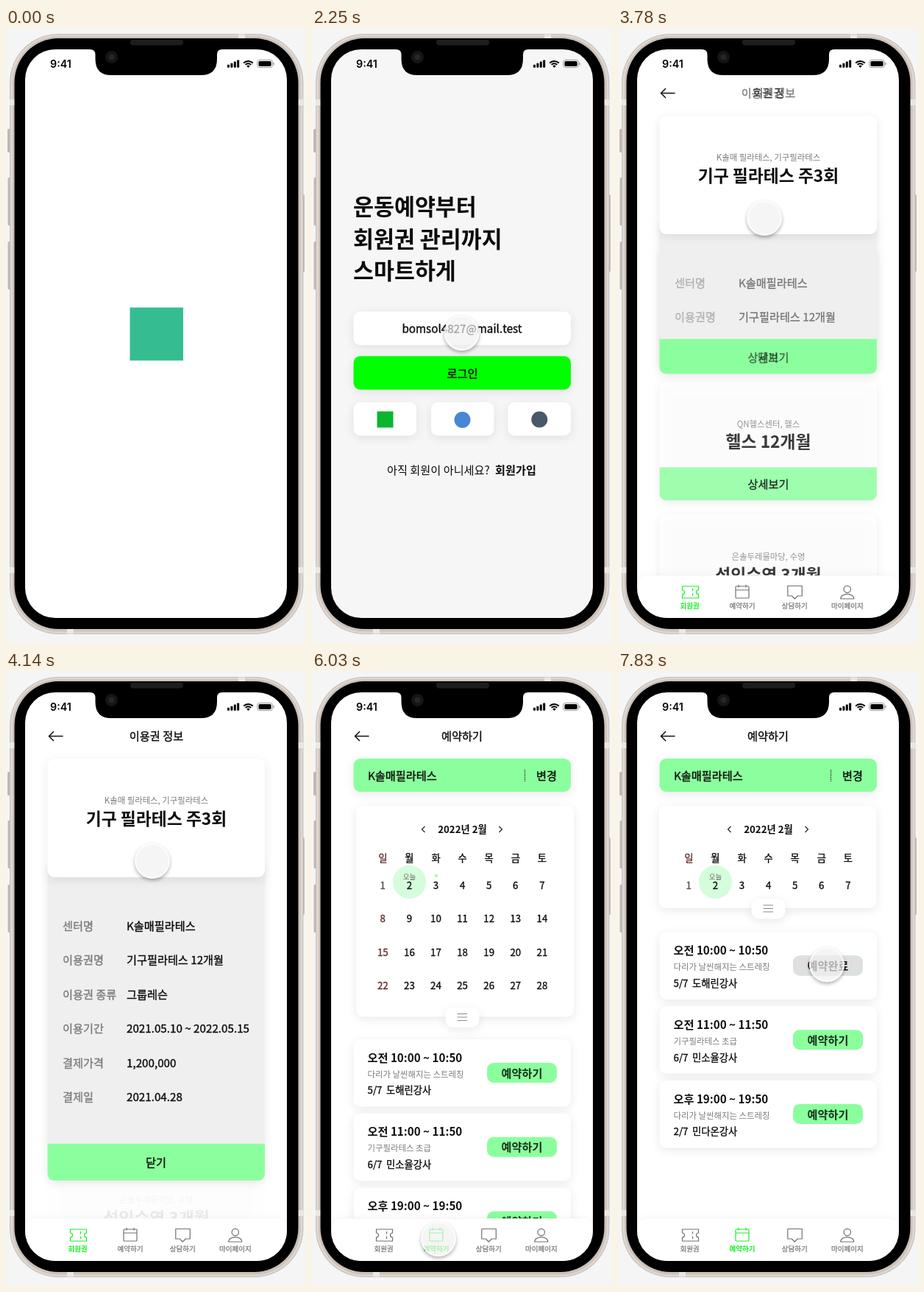
Animation of 408 by 835 pixels, one loop 8000 ms. Source, as an HTML page with a canvas:

```html
<!DOCTYPE html>
<html lang="ko">
<head>
<meta charset="utf-8">
<title>운동 예약 앱</title>
<style>
  html, body { margin: 0; width: 100%; height: 100%; overflow: hidden; background: #f5f5f5; }
  canvas { display: block; width: 408px; height: 835px; }
</style>
</head>
<body>
<canvas id="stage"></canvas>
<script>
const LOOP = 8000;
const FONT = '"Noto Sans CJK KR", "Noto Sans KR", "Noto Sans CJK", sans-serif';
const GREEN = '#8bff9d';
const INK = '#0c0c0c';
const GRAY = '#7c7c7c';
const TABS_TOP = 743.5;

const canvas = document.getElementById('stage');
const c = canvas.getContext('2d');
const dpr = window.devicePixelRatio || 1;
canvas.width = 408 * dpr;
canvas.height = 835 * dpr;

// timing helpers
const clamp = v => Math.max(0, Math.min(1, v));
const span = (t, a, b) => clamp((t - a) / (b - a));
const smooth = u => u * u * (3 - 2 * u);
const easeOut = u => 1 - (1 - u) ** 3;
const mix = (a, b, u) => a + (b - a) * u;
const leaving = p => 1 - p ** 2.5;

// drawing helpers
function fade(alpha, draw) {
  if (alpha <= 0) return;
  c.save();
  c.globalAlpha *= alpha;
  draw();
  c.restore();
}

function clipped(x, y, w, h, draw) {
  c.save();
  c.beginPath();
  c.rect(x, y, w, h);
  c.clip();
  draw();
  c.restore();
}

function box(x, y, w, h, r, color) {
  c.fillStyle = color;
  c.beginPath();
  c.roundRect(x, y, w, h, r);
  c.fill();
}

function card(x, y, w, h, r = 9, color = '#fff') {
  c.save();
  c.shadowColor = 'rgba(0,0,0,.09)';
  c.shadowBlur = 14 * dpr;
  c.shadowOffsetY = 3 * dpr;
  box(x, y, w, h, r, color);
  c.restore();
}

// Medium weight is the regular cut thickened by a hairline.
function text(s, x, y, size, color = INK, weight = 500, align = 'center', font = FONT) {
  c.font = `${weight} ${size}px ${font}`;
  c.fillStyle = color;
  c.textAlign = align;
  c.fillText(s, x, y + size * 0.37);
  if (weight === 500) {
    c.strokeStyle = color;
    c.lineWidth = size * 0.024;
    c.lineJoin = 'round';
    c.strokeText(s, x, y + size * 0.37);
  }
}

function disc(x, y, r, color) {
  c.fillStyle = color;
  c.beginPath();
  c.arc(x, y, r, 0, 7);
  c.fill();
}

function line(color, width, ...pts) {
  c.strokeStyle = color;
  c.lineWidth = width;
  c.lineJoin = 'miter';
  c.beginPath();
  for (let i = 0; i < pts.length; i += 2) c.lineTo(pts[i], pts[i + 1]);
  c.stroke();
}

// phone
function drawPhone() {
  for (const [x, y, h] of [[2, 137, 32], [2.5, 203, 65], [2.5, 290, 65], [402, 226, 105]])
    box(x, y, 4, h, 1.5, '#bdb7b2');
  box(5, 8, 399.5, 815, 66, '#c6beb8');
  box(6, 9, 397.5, 813, 65, '#ded7d0');
  box(9, 11.5, 391.5, 808, 62, '#cbc2bb');
  for (const y of [97, 732]) {
    box(5, y, 7, 8, 0, '#ebe7e3');
    box(397.5, y, 7, 8, 0, '#ebe7e3');
  }
  box(316, 8.5, 9, 6, 0, '#ebe7e3');
  box(83, 816, 9, 6.5, 0, '#ebe7e3');
  box(11.5, 14, 386, 802, 60, '#000');
}

function drawNotch() {
  c.fillStyle = '#000';
  c.beginPath();
  c.moveTo(114, 28);
  c.lineTo(294, 28);
  c.lineTo(294, 29);
  c.quadraticCurveTo(287, 29, 287, 36);
  c.lineTo(287, 42);
  c.quadraticCurveTo(287, 64, 265, 64);
  c.lineTo(143, 64);
  c.quadraticCurveTo(121.5, 64, 121.5, 42);
  c.lineTo(121.5, 36);
  c.quadraticCurveTo(121.5, 29, 114, 29);
  c.fill();
  box(169, 15.5, 72, 8, 4, '#1d1d1d');
  disc(143.5, 39.5, 8.5, '#151515');
  disc(143.5, 39.5, 4, '#262626');
}

function drawStatus() {
  text('9:41', 74.5, 48.5, 14.3, '#000', 600, 'center', 'Inter, sans-serif');
  for (let i = 0; i < 4; i++) {
    const h = 4 + 2.1 * i;
    box(301 + 4.4 * i, 53.8 - h, 3, h, 0.8, '#000');
  }
  c.strokeStyle = '#000';
  c.lineWidth = 2;
  for (const r of [8.6, 5.2]) {
    c.beginPath();
    c.arc(329.5, 53.5, r, -Math.PI * 0.76, -Math.PI * 0.24);
    c.stroke();
  }
  c.fillStyle = '#000';
  c.beginPath();
  c.moveTo(329.5, 54);
  c.arc(329.5, 53.5, 2.8, -Math.PI * 0.78, -Math.PI * 0.22);
  c.fill();
  c.strokeStyle = '#999';
  c.lineWidth = 1;
  c.beginPath();
  c.roundRect(341.8, 43.4, 20.6, 10.2, 3);
  c.stroke();
  box(343.5, 45, 17.2, 7, 1.7, '#000');
  box(363.4, 46.8, 1.3, 3.6, 0.6, '#999');
}

// shared parts
function backArrow() {
  line('#111', 1.5, 77.5, 88.5, 58.5, 88.5);
  line('#111', 1.5, 65, 82, 58.5, 88.5, 65, 95);
}

const tabIcons = [
  x => {
    c.beginPath();
    c.moveTo(x - 11, 758);
    c.lineTo(x + 11, 758);
    c.lineTo(x + 11, 763);
    c.arc(x + 11, 766, 3, -Math.PI / 2, Math.PI / 2, true);
    c.lineTo(x + 11, 774);
    c.lineTo(x - 11, 774);
    c.lineTo(x - 11, 769);
    c.arc(x - 11, 766, 3, Math.PI / 2, -Math.PI / 2, true);
    c.closePath();
    c.moveTo(x + 3, 761); c.lineTo(x + 3, 764.5);
    c.moveTo(x + 3, 767.5); c.lineTo(x + 3, 771);
    c.stroke();
  },
  x => {
    c.beginPath();
    c.roundRect(x - 9, 758, 18, 16, 1);
    c.moveTo(x - 9, 763); c.lineTo(x + 9, 763);
    c.moveTo(x - 5, 756); c.lineTo(x - 5, 759.5);
    c.moveTo(x + 5, 756); c.lineTo(x + 5, 759.5);
    c.stroke();
  },
  x => {
    c.beginPath();
    c.moveTo(x - 9.5, 757.5);
    c.lineTo(x + 10, 757.5);
    c.lineTo(x + 10, 771);
    c.lineTo(x + 4, 771);
    c.lineTo(x, 775);
    c.lineTo(x - 4, 771);
    c.lineTo(x - 9.5, 771);
    c.closePath();
    c.stroke();
  },
  x => {
    c.beginPath();
    c.arc(x, 762, 4.7, 0, 7);
    c.moveTo(x - 9, 775);
    c.bezierCurveTo(x - 9, 766.5, x + 9, 766.5, x + 9, 775);
    c.closePath();
    c.stroke();
  }
];

function drawTabs(second) {
  card(26, TABS_TOP, 356, 70, 14);
  ['회원권', '예약하기', '상담하기', '마이페이지'].forEach((label, i) => {
    const on = [1 - second, second, 0, 0][i];
    const x = [98.5, 169, 240.3, 311.8][i];
    const color = `rgb(${mix(112, 20, on)},${mix(112, 240, on)},${mix(112, 35, on)})`;
    c.strokeStyle = color;
    c.lineWidth = 1.2;
    tabIcons[i](x);
    text(label, i ? x : 97.5, 784, 9.5, color, on > 0.5 ? 700 : 500);
  });
}

// screens
function drawLogin(filled) {
  ['운동예약부터', '회원권 관리까지', '스마트하게'].forEach((s, i) =>
    text(s, 56, 243 + 43.6 * i, 30.4, INK, 700, 'left'));
  card(56.5, 385, 295.5, 45.5);
  fade(1 - filled, () => text('이메일을 입력해주세요', 204, 408, 15.2, '#bdb9b8'));
  fade(filled, () => text('bomsol4827@mail.test', 204, 408, 15.2));
  card(56.5, 445.5, 295.5, 45.5, 9, '#00ff00');
  text('로그인', 204.5, 469, 15.2);
  for (const x of [56.5, 162, 266.5]) card(x, 508, 85.5, 45.5);
  box(88.5, 520.5, 22, 22, 0, '#0ab52f');
  disc(204.5, 532, 11, '#4787d3');
  disc(309.3, 531.5, 11, '#4a5868');
  text('아직 회원이 아니세요?', 102, 600, 15.2, INK, 400, 'left');
  text('회원가입', 249, 600, 15.2, INK, 700, 'left');
}

const passes = [
  ['K솔매 필라테스, 기구필라테스', '기구 필라테스 주3회'],
  ['토란줄기짐, PT', 'PT 7개월 10회'],
  ['QN헬스센터, 헬스', '헬스 12개월'],
  ['은솔두레물마당, 수영', '성인수영 3개월']
];

const details = [
  ['센터명', 'K솔매필라테스'],
  ['이용권명', '기구필라테스 12개월'],
  ['이용권 종류', '그룹레슨'],
  ['이용기간', '2021.05.10 ~ 2022.05.15'],
  ['결제가격', '1,200,000'],
  ['결제일', '2021.04.28']
];

function passCard(i, y) {
  card(56.5, y, 295.5, 161);
  text(passes[i][0], 204.5, y + 57, 11.4, GRAY, 400);
  text(passes[i][1], 204.5, y + 81.5, 22.8, INK, 700);
}

function drawPasses(open) {
  const grow = easeOut(open);
  backArrow();
  fade(1 - grow, () => text('회원권', 204.5, 88.5, 15.2));
  fade(grow, () => text('이용권 정보', 204.5, 88.5, 15.2));
  fade(1 - open, () => {
    for (let i = 1; i < 4; i++) {
      const y = 119 + 180.7 * i;
      passCard(i, y);
      box(56.5, y + 116, 295.5, 45, [0, 0, 9, 9], GREEN);
      text('상세보기', 204.5, y + 139, 15.2);
    }
  });

  const top = mix(235, 642, grow);
  const height = mix(45, 50, grow);
  if (top > 270) {
    card(56.5, 262, 295.5, top + height - 262, 9, '#efefef');
    clipped(56, 270, 297, top - 270, () =>
      fade(grow, () => details.forEach(([name, value], i) => {
        const y = 346 + 46.5 * i;
        text(name, 77, y, 15.2, GRAY, 500, 'left');
        text(value, 164, y, 15.2, INK, 500, 'left');
      })));
  }
  passCard(0, 119);
  box(56.5, top, 295.5, height, [0, 0, 9, 9], GREEN);
  const mid = top + height / 2 + 1;
  fade(1 - grow, () => text('상세보기', 204.5, mid, 15.2));
  fade(grow, () => text('닫기', 204, mid, 15.2));
}

const lessons = [
  ['오전 10:00 ~ 10:50', '다리가 날씬해지는 스트레칭', '5/7', '도해린강사'],
  ['오전 11:00 ~ 11:50', '기구필라테스 초급', '6/7', '민소율강사'],
  ['오후 19:00 ~ 19:50', '다리가 날씬해지는 스트레칭', '2/7', '민다온강사']
];

function drawCalendar(fold) {
  const x = mix(60, 55.5, fold);
  const bottom = mix(469.5, 322, fold);
  card(x, 182.5, 296, bottom - 182.5);
  text('2022년 2월', 204.5, 215, 13.3, INK, 700);
  line('#222', 1.2, 153.5, 211, 149.5, 215, 153.5, 219);
  line('#222', 1.2, 254.5, 211, 258.5, 215, 254.5, 219);
  disc(132.5, 286.5, 22.7, '#d5fddc');
  text('오늘', 132.5, 279, 9.5, '#666', 400);
  fade(1 - fold, () => disc(169, 278, 2.4, '#aaffba'));

  clipped(x, 182, 296, bottom - 182, () => {
    for (let col = 0; col < 7; col++) {
      const cx = 96.3 + 36.1 * col;
      const color = col ? INK : '#5c2b27';
      text('일월화수목금토'[col], cx, 254.5, 13.3, color);
      for (let row = 0; row < 4; row++) {
        const day = row * 7 + col + 1;
        fade(row ? 1 - fold : 1, () =>
          text(day, cx, 291 + 45.5 * row, 13.3, day === 1 ? '#555' : color));
      }
    }
  });

  card(181.5, bottom - 12.5, 46, 27, 10);
  for (const d of [-4.5, 0, 4.5])
    line('#8a8a8a', 1.1, 197.5, bottom + 0.5 + d, 211, bottom + 0.5 + d);
}

function drawBooking(fold, booked) {
  backArrow();
  text('예약하기', 204, 88.5, 15.2);
  card(56.5, 119, 295.5, 45, 9, GREEN);
  text('K솔매필라테스', 76, 142, 15.2, INK, 500, 'left');
  text('변경', 319, 142, 15.2);
  c.setLineDash([1.5, 1]);
  line('#333', 1.2, 289.5, 134, 289.5, 150);
  c.setLineDash([]);

  lessons.forEach(([when, name, seats, coach], i) => {
    const y = mix(500, 354.5, fold) + 100.7 * i;
    card(56.5, y, 295.5, 91.5);
    text(when, 75.5, y + 25, 15.2, INK, 700, 'left');
    text(name, 75.5, y + 47.5, 11.4, GRAY, 400, 'left');
    text(seats, 75.5, y + 69.5, 13.3, INK, 500, 'left');
    text(coach, 101, y + 69.5, 13.3, INK, 500, 'left');
    const done = i ? 0 : booked;
    box(238, y + 32, 95, 27, 9, GREEN);
    fade(done, () => box(238, y + 32, 95, 27, 9, '#dfdfe1'));
    fade(1 - done, () => text('예약하기', 285.5, y + 46, 15.2, '#17301c', 700));
    fade(done, () => text('예약완료', 285.5, y + 46, 15.2, '#222', 700));
  });
  drawCalendar(fold);
}

// pointer: [start, end, x, y]
const moves = [
  [900, 1620, 204, 410],
  [2160, 2700, 200, 464],
  [3260, 3690, 199, 258],
  [4300, 4860, 205, 660],
  [5400, 5660, 172, 771],
  [6300, 6570, 204, 470],
  [7110, 7470, 284, 398.5]
];

function drawPointer(t) {
  let x = 275, y = 690;
  for (const [a, b, toX, toY] of moves) {
    const u = smooth(span(t, a, b));
    x = mix(x, toX, u);
    y = mix(y, toY, u);
  }
  fade(span(t, 860, 1040), () => {
    const r = 23.8;
    c.save();
    c.beginPath();
    c.rect(0, 0, 408, 835);
    c.arc(x, y, r, 0, 7);
    c.clip('evenodd');
    c.shadowColor = 'rgba(0,0,0,.32)';
    c.shadowBlur = 5 * dpr;
    c.shadowOffsetY = 2.5 * dpr;
    disc(x, y, r, '#fff');
    c.restore();
    disc(x, y, r, 'rgba(241,241,241,.68)');
    c.strokeStyle = 'rgba(255,255,255,.75)';
    c.lineWidth = 2;
    c.beginPath();
    c.arc(x, y, r - 1, 0, 7);
    c.stroke();
  });
}

function render(t) {
  const login = smooth(span(t, 360, 720));
  const filled = smooth(span(t, 1710, 2070));
  const home = smooth(span(t, 2790, 3240));
  const open = t < 5080 ? span(t, 3690, 4180) : 1 - span(t, 5080, 5400);
  const booking = smooth(span(t, 5670, 6030));
  const fold = smooth(span(t, 6750, 7110));
  const booked = smooth(span(t, 7560, 7830));

  c.setTransform(dpr, 0, 0, dpr, 0, 0);
  c.fillStyle = '#f5f5f5';
  c.fillRect(0, 0, 408, 835);
  drawPhone();

  c.save();
  c.beginPath();
  c.roundRect(26, 29, 356, 772, 41);
  c.clip();
  const tone = 255 - 9 * login * (1 - home);
  c.fillStyle = `rgb(${tone},${tone},${tone})`;
  c.fillRect(26, 29, 356, 772);

  fade(leaving(login), () => box(168.5, 379.5, 72.5, 72, 0, '#35bd91'));
  if (home < 1) fade(login * leaving(home), () => drawLogin(filled));
  clipped(26, 29, 356, TABS_TOP - 29, () => {
    if (booking < 1) fade(home * leaving(booking), () => drawPasses(open));
    fade(booking, () => drawBooking(fold, booked));
  });
  fade(home, () => drawTabs(booking));
  drawPointer(t);
  c.restore();

  drawNotch();
  drawStatus();
}

const start = performance.now();
function tick() {
  render((performance.now() - start) % LOOP);
  requestAnimationFrame(tick);
}
tick();
</script>
</body>
</html>
```
